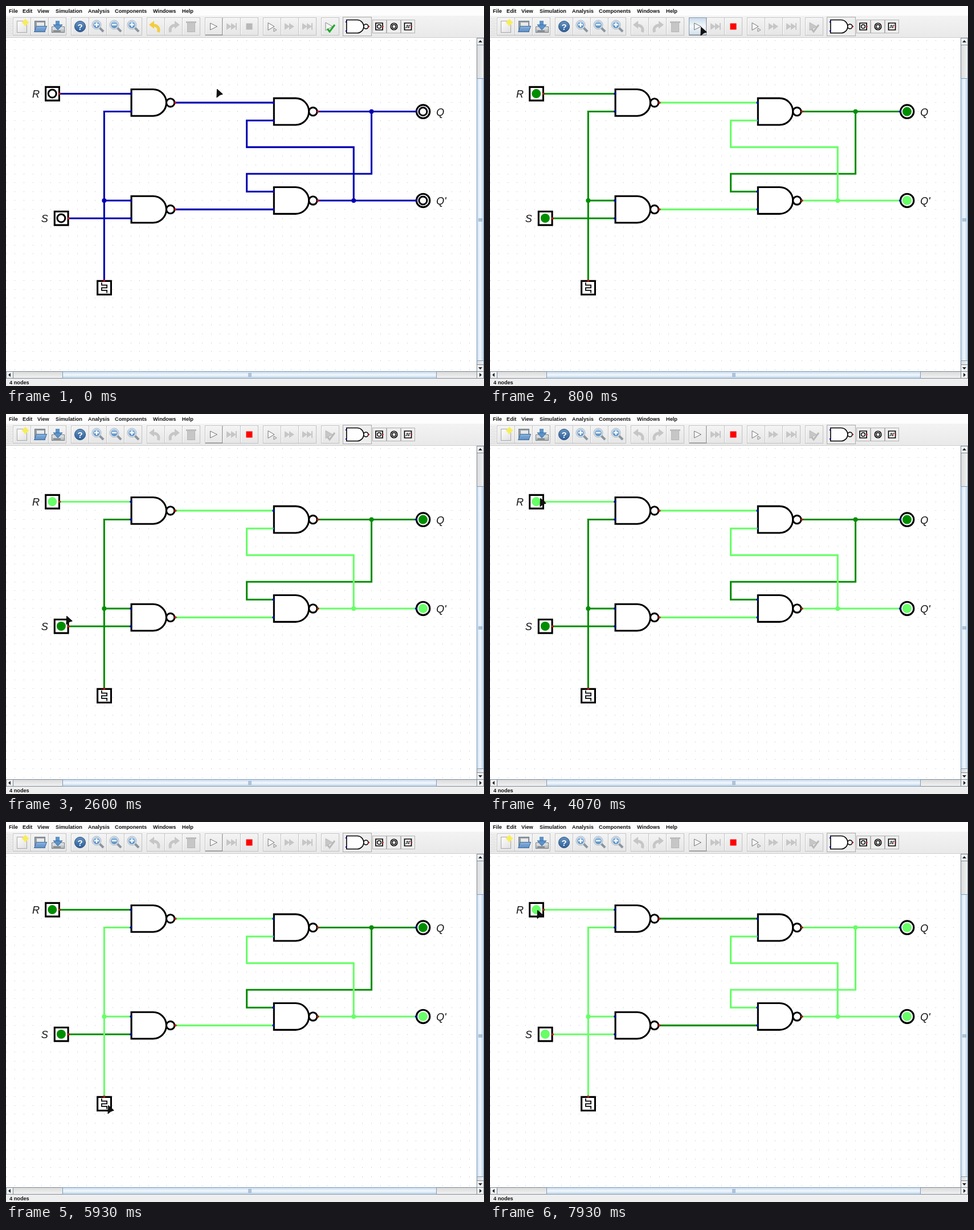
An HTML page with a canvas for the animation above (8000 ms loop, 839x668 px).

```html
<!DOCTYPE html>
<html lang="en">
<head>
<meta charset="utf-8">
<title>Gated latch simulation</title>
<style>
html, body { margin: 0; width: 839px; height: 668px; overflow: hidden; background: #fff; }
canvas { display: block; }
</style>
</head>
<body>
<canvas id="stage" width="839" height="668"></canvas>
<script>
const g = document.getElementById('stage').getContext('2d');
const LOOP = 8000, FRAME = 1000 / 15, U = 15.64;
const HIGH = '#66ff66', LOW = '#008e00', IDLE = '#0000b2', GREY = '#c6c6c6';
const gx = i => 0.3 + U * i, gy = j => 13.5 + U * j;

// drawing helpers
function paint(fill, stroke, width = 1) {
  if (fill) { g.fillStyle = fill; g.fill(); }
  if (stroke) { g.strokeStyle = stroke; g.lineWidth = width; g.stroke(); }
}
function box(x, y, w, h, fill, edge) {
  if (fill) { g.fillStyle = fill; g.fillRect(x, y, w, h); }
  if (edge) { g.strokeStyle = edge; g.lineWidth = 1; g.strokeRect(x + .5, y + .5, w - 1, h - 1); }
}
function square(x, y, half, width) {
  g.beginPath();
  g.rect(x - half, y - half, 2 * half, 2 * half);
  paint('#fff', '#000', width);
}
function disc(x, y, r, fill, stroke, width) {
  g.beginPath();
  g.arc(x, y, r, 0, 7);
  paint(fill, stroke, width);
}
function line(pts, color, width) {
  g.beginPath();
  pts.forEach(([x, y]) => g.lineTo(x, y));
  paint(null, color, width);
}
function arrow(x, y, angle, length, half, fill, edge) {
  g.save();
  g.translate(x, y);
  g.rotate(angle);
  g.beginPath();
  g.moveTo(0, -half);
  g.lineTo(length, 0);
  g.lineTo(0, half);
  g.closePath();
  paint(fill, edge);
  g.restore();
}
function shade(x0, y0, x1, y1, ...colors) {
  const s = g.createLinearGradient(x0, y0, x1, y1);
  colors.forEach((c, i) => s.addColorStop(i / (colors.length - 1), c));
  return s;
}
function text(s, x, y, font, color = '#111') {
  g.font = font + ' "Liberation Sans", Arial, sans-serif';
  g.fillStyle = color;
  g.fillText(s, x, y);
}

// pointer moves: each one glides to a spot, optionally along a bowed line
const MOVES = [
  { from: 67, to: 733, x: 369, y: 36 },
  { from: 1067, to: 1667, x: 84, y: 154 },
  { from: 2067, to: 2133, x: 91, y: 163 },
  { from: 2333, to: 2600, x: 105, y: 354 },
  { from: 2600, to: 2800, x: 91, y: 376 },
  { from: 3800, to: 4067, x: 87, y: 147 },
  { from: 4067, to: 4200, x: 75, y: 158 },
  { from: 5133, to: 5733, x: 178, y: 497, bow: 62 },
  { from: 6000, to: 6667, x: 99, y: 367 },
  { from: 7067, to: 7467, x: 79, y: 154, bow: 8 },
  { from: 7600, to: 7867, x: 82, y: 154 }];

function pointer(t) {
  let x = 369, y = 145;
  for (const m of MOVES) {
    if (t <= m.from) break;
    const s = Math.min(1, (t - m.from) / (m.to - m.from)), ease = s * s * (3 - 2 * s);
    x += (m.x - x) * ease + (m.bow || 0) * Math.sin(Math.PI * s);
    y += (m.y - y) * ease;
  }
  return [x, y];
}

function circuitState(t) {
  const R = (t >= 1930 && t < 4395) || t >= 7665;
  const S = (t >= 2930 && t < 3330) || t >= 6797;
  const C = t >= 5930;
  const top = !(R && C), bottom = !(S && C);
  return { on: t >= 797, R, S, C, top, bottom, Q: !top, P: true };
}

// toolbar
function button(x, hot, raised) {
  const face = hot ? shade(0, 20, 0, 51, '#c5d9ea', '#f4f8fc', '#cfdeeb') : shade(0, 20, 0, 51, '#f4f4f4', '#e6e6e6');
  box(x, 20, 32, 32, face, hot ? '#8297ab' : '#c2c2c2');
  if (!hot) line([[x + 1.5, 50], [x + 1.5, 21.5], [x + 30, 21.5]], '#fff', 1);
  if (raised) line([[x + 31, 21], [x + 31, 51], [x + 1, 51]], '#8f8f8f', 1.5);
}
function magnifier(x, zoomIn) {
  line([[x + 3, 38], [x + 10, 45]], '#8b959e', 4);
  disc(x - 2, 33, 7, shade(x, 26, x, 41, '#a9cbea', '#4a83bb'), '#dbe2e8', 2);
  disc(x - 2, 33, 8, null, '#8fa3b5', .7);
  box(x - 6, 32, 8, 2, '#fff');
  if (zoomIn) box(x - 3, 29, 2, 8, '#fff');
}
function curlArrow(x, dir, color) {
  g.save();
  g.translate(x, 36);
  g.scale(dir, 1);
  g.beginPath();
  g.arc(-2, 6, 8, -Math.PI / 2, .5);
  paint(null, color, 5);
  arrow(-2, -3, Math.PI, 9, 7, color);
  g.restore();
}
function fileIcons() {
  box(19, 26, 18, 21, shade(19, 26, 36, 47, '#fff', '#e0e0e0'), '#a7a7a7');
  for (let a = 0; a < 4; a++) arrow(34, 29, a * Math.PI / 2, 7, 4, '#f8ed59');
  disc(34, 29, 4.5, '#f8ed59');
  box(50, 26, 19, 20, '#999f9f', '#667788');
  box(54, 29, 13, 10, '#e7e9ea');
  g.save();
  g.transform(1, 0, -.35, 1, 66, 35);
  box(-13, 0, 19, 11, shade(0, 0, 0, 11, '#8db5de', '#5a8bc0'), '#3d6ca1');
  g.restore();
  box(80, 36, 23, 11, shade(0, 36, 0, 47, '#eef0f0', '#a8adb0'), '#777f85');
  box(83, 43, 13, 2, '#737b80');
  box(87, 26, 7, 9, '#5c93ca');
  arrow(91, 33, Math.PI / 2, 9, 8, '#5c93ca', '#396ca2');
}

// D-shaped gate with an inverting bubble, used in the circuit and on its button
function gateShape(x, y, r, flat, bubble, width) {
  g.beginPath();
  g.moveTo(x, y - r);
  g.arc(x + flat, y, r, -Math.PI / 2, Math.PI / 2);
  g.lineTo(x, y + r);
  g.closePath();
  paint('#fff', '#000', width);
  disc(x + flat + r + bubble, y, bubble, '#fff', '#000', width);
}
// square wave running upwards
function wave(x, y, step, width) {
  const pts = [];
  for (let k = 0; k < 4; k++) {
    const side = x + (k % 2 ? step : -step);
    pts.push([side, y + (k - 2) * step], [side, y + (k - 1) * step]);
  }
  line(pts, '#000', width);
}
function componentButtons() {
  box(591, 19, 51, 34, '#eee', '#aaa');
  for (let i = 0; i < 3; i++) box(643 + 25 * i, 24, 25, 24, '#eee', '#b3b3b3');
  gateShape(597.8, 36, 11.5, 18.5, 4, 1.6);
  for (const y of [28, 44]) disc(597, y, 1.2, IDLE);
  square(655, 36, 6, 1.7);
  disc(655, 36, 3.3, null, '#000', 1.5);
  disc(681, 36, 5.8, '#fff', '#000', 1.6);
  disc(681, 36, 3.3, null, '#000', 1.5);
  square(705.5, 36, 6, 1.7);
  g.save();
  g.translate(705.5, 36);
  g.rotate(Math.PI / 2);
  wave(0, 0, 2.2, 1);
  g.restore();
  for (const x of [637, 661.5, 711.7]) disc(x, 36, 1.2, '#d00');
}
function toolbar(on, hover) {
  box(0, 0, 839, 17, '#fdfdfd');
  box(0, 17, 839, 39, shade(0, 17, 0, 56, '#f3f3f3', '#e9e9e9'));
  box(0, 55, 839, 1, '#cfcfcf');
  const menus = { File: 5, Edit: 29, View: 55, Simulation: 87, Analysis: 144, Components: 191, Windows: 258, Help: 309 };
  for (const name in menus) text(name, menus[name], 12, 'bold 9.2px');
  for (let y = 21; y < 52; y += 3)
    for (let x = 2; x < 10; x += 3) box(x + (y % 2 ? 0 : 1.5), y, 1, 1, '#bdbdbd');
  let left = 12;
  for (const count of [3, 4, 3, 3, 3, 1]) {
    for (let i = 0; i < count; i++, left += 31)
      button(left, left === 349 && hover, left === 349 || left === 450);
    left += 9;
  }
  fileIcons();
  disc(130, 36, 9.5, shade(0, 26, 0, 46, '#6794c3', '#2b5d97'), '#274f80');
  text('?', 125.5, 41.5, 'bold 15px', '#fff');
  for (let i = 0; i < 3; i++) magnifier(161 + 31 * i, i !== 1);
  curlArrow(262, 1, on ? GREY : '#f3cd3f');
  curlArrow(294, -1, GREY);
  box(318, 29, 14, 17, GREY, '#b6b6b6');
  box(316, 27, 18, 3, '#bdbdbd');
  arrow(358.5, 36, 0, 12, 6, '#f7f7f7', '#777');
  for (const x of [387, 489, 520]) {
    for (const dx of [0, 8]) arrow(x + dx, 36, 0, 9, 6, GREY);
    if (x !== 489) box(x + 16, 30, 2, 12, GREY);
  }
  box(421.5, 30.5, 11, 11, on ? '#f00' : '#b8b8b8');
  arrow(460, 36, 0, 11, 6.5, '#f7f7f7', '#777');
  arrow(470, 42, 0, 5, 3, '#eee', '#888');
  arrow(561, 36, 0, 12, 7, on ? GREY : '#f5f5f5', on ? '#bbb' : '#888');
  line([[564, 40], [568, 45], [577, 33]], on ? '#b9b9b9' : '#1cab26', 3);
  componentButtons();
}

// vertical and horizontal bars share one drawing, made along the x axis
function scrollbar(length, from, to) {
  const edge = '#7a8a99';
  box(0, 0, length, 13, shade(0, 0, 0, 13, '#d9d9d9', '#f3f3f3'), edge);
  box(from, 0, to - from, 13, shade(0, 0, 0, 13, '#c4d8ec', '#f2f7fc', '#b8cfe5'), '#7d9bbb');
  for (let i = -2; i < 3; i += 2) box((from + to) / 2 + i, 3, 1, 7, '#7295bc');
  for (const x of [0, length - 13]) box(x, 0, 13, 13, '#f1f1f1', edge);
  arrow(8, 6.5, Math.PI, 4, 3.5, '#222');
  arrow(length - 8, 6.5, 0, 4, 3.5, '#222');
}
function windowEdges() {
  box(0, 642, 839, 26, '#eee');
  g.save();
  g.translate(0, 642);
  scrollbar(839, 99, 756);
  g.restore();
  g.save();
  g.transform(0, 1, 1, 0, 826, 56);
  scrollbar(587, 71, 568);
  g.restore();
  text('4 nodes', 6, 665, 'bold 9.2px');
}

// circuit parts, placed in grid units
const wire = (color, ...pts) => line(pts.map(([i, j]) => [gx(i), gy(j)]), color, 3.1);
const node = (color, i, j) => disc(gx(i), gy(j), 4, color);
const pin = (i, j, color) => disc(gx(i), gy(j), 2, color);
const inPin = (i, j) => pin(i, j, IDLE);
const outPin = (i, j) => pin(i, j, '#c80000');

function nand(i, j) {
  gateShape(gx(i) + .8, gy(j), 23.4, 38, 7.2, 3.1);
  inPin(i, j - 1);
  inPin(i, j + 1);
  outPin(i + 5, j);
}
function lamp(x, y, color) {
  if (color === IDLE) disc(x, y, 7, null, '#000', 3);
  else disc(x, y, 8, color);
}
function input(i, j, color, name) {
  const x = gx(i) - 12.6, y = gy(j);
  square(x, y, 11.9, 3.1);
  lamp(x - .3, y - .2, color);
  outPin(i, j);
  text(name, x - 35.5, y + 7, 'italic 18px');
}
function output(i, j, color, name) {
  const x = gx(i) + 12.4, y = gy(j);
  disc(x, y, 11.7, '#fff', '#000', 3.1);
  lamp(x - .2, y, color);
  inPin(i, j);
  text(name, x + 23, y + 7, 'italic 18px');
}
function circuit(st) {
  const tint = key => st.on ? (st[key] ? HIGH : LOW) : IDLE;
  box(0, 56, 826, 586, '#fff');
  for (let i = 0; i < 53; i++)
    for (let j = 3; j < 41; j++) box(Math.floor(gx(i)), Math.floor(gy(j)), 1, 1, '#bcbcbc');

  const R = tint('R'), S = tint('S'), C = tint('C');
  wire(R, [6, 9], [14, 9]);
  wire(S, [7, 23], [14, 23]);
  wire(C, [11, 30], [11, 11], [14, 11]);
  wire(C, [11, 21], [14, 21]);
  node(C, 11, 21);

  // the two halves of the latch mirror each other around row 16
  for (const s of [-1, 1]) {
    const drive = 16 + 6 * s, out = 16 + 5 * s, tap = 40 - s;
    const bend = 16.5 - 1.5 * s, back = 16 - 4 * s;
    const color = tint(s < 0 ? 'Q' : 'P');
    wire(tint(s < 0 ? 'top' : 'bottom'), [19, drive], [30, drive]);
    wire(color, [35, out], [46, out]);
    wire(color, [tap, out], [tap, bend], [27, bend], [27, back], [30, back]);
    node(color, tap, out);
    nand(14, drive);
    nand(30, out);
    output(46, out, color, s < 0 ? 'Q' : "Q'");
  }
  input(6, 9, R, 'R');
  input(7, 23, S, 'S');
  square(172.5, 495.3, 11.9, 3.1);
  wave(172.5, 495.3, 4.6, 1.7);
  outPin(11, 30);
}

function cursor(x, y) {
  g.lineJoin = 'round';
  g.beginPath();
  g.moveTo(x + 1.6, y + 1.5);
  g.lineTo(x + 11, y + 10);
  g.lineTo(x + 6, y + 11.5);
  g.lineTo(x + 1, y + 15.5);
  g.closePath();
  paint('#111', '#111', 1.2);
  g.lineJoin = 'miter';
}

function render(now) {
  const t = Math.floor((now % LOOP + 3.4) / FRAME) * FRAME;
  const st = circuitState(t), [x, y] = pointer(t);
  circuit(st);
  toolbar(st.on, x > 347 && x < 379 && y > 18 && y < 50);
  windowEdges();
  cursor(x, y);
}

const start = performance.now();
function tick() {
  render(performance.now() - start);
  requestAnimationFrame(tick);
}
tick();
</script>
</body>
</html>
```
